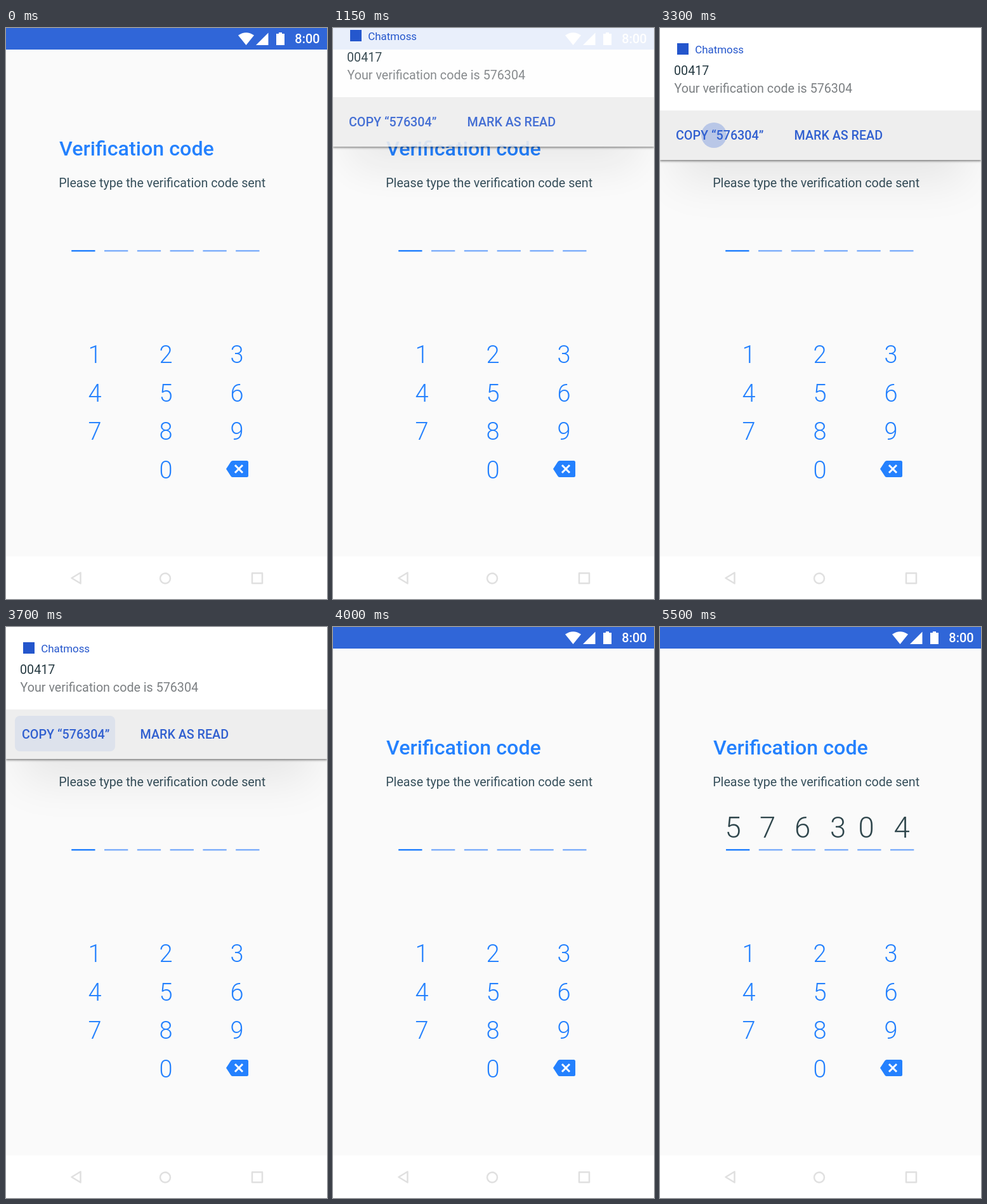
Animation, 506 px wide and 900 px high, one loop 7.5 s. Source, as an HTML page:

```html
<!DOCTYPE html>
<html lang="en">
<head>
<meta charset="utf-8">
<title>Verification code</title>
<style>
  html, body { margin: 0; width: 100%; height: 100%; overflow: hidden; background: #fafafa; }
  #stage { position: relative; width: 506px; height: 900px; overflow: hidden; background: #fafafa; }
  svg { position: absolute; left: 0; top: 0; overflow: visible; }
  text { font-family: Roboto, sans-serif; font-size: 19.7px; }
  .blue { fill: #2481fe; }
  .medium { font-weight: 500; }
  .key { font-size: 38px; font-weight: 300; text-anchor: middle; }
  .digit { font-size: 45.5px; font-weight: 300; text-anchor: middle; fill: #2f464c; }
  .action { font-weight: 500; fill: #3160d0; }
  #card, #popup { position: absolute; opacity: 0; background: #fff; }
  #card {
    left: 0; top: 0; width: 506px; height: 208px;
    box-shadow: 0 2px 3px rgba(0,0,0,.45), 0 60px 70px -25px rgba(0,0,0,.08);
  }
  #popup {
    left: 257px; top: 341px; width: 160px; height: 52px; border-radius: 3px;
    box-shadow: 0 2px 5px rgba(0,0,0,.3);
  }
</style>
</head>
<body>
<div id="stage">
  <svg width="506" height="900" viewBox="0 0 506 900">
    <rect width="506" height="34" fill="#3066d8"/>
    <g fill="#fff">
      <path d="M366 11.5Q378.5 3 391 11.5L378.5 27Z"/>
      <path d="M394 27L413.5 7.5V27Z"/>
      <path d="M426 9H430V7H435V9H439V27H426Z"/>
      <text class="medium" x="455.3" y="24" style="font-size:20px">8:00</text>
    </g>

    <text class="blue medium" x="84" y="201" style="font-size:32.2px">Verification code</text>
    <text x="83.2" y="250.5" fill="#37505c">Please type the verification code sent</text>

    <g id="lines"></g>
    <g id="digits" opacity="0"></g>
    <g id="keys" class="blue"></g>

    <path class="blue" d="M347 695L354.5 683.5Q355.5 682 357.5 682H379.5Q382 682 382 684.5V705.5Q382 708 379.5 708H357.5Q355.5 708 354.5 706.5Z"/>
    <path d="M361 689L373 701M373 689L361 701" stroke="#fff" stroke-width="3"/>

    <rect y="833" width="506" height="67" fill="#fff"/>
    <g fill="none" stroke="#e0e0e0" stroke-width="2.5" stroke-linejoin="round">
      <path d="M103.5 867L117.5 858.5V875.5Z"/>
      <circle cx="251" cy="867.5" r="8"/>
      <rect x="388" y="859.3" width="16" height="16"/>
    </g>
  </svg>

  <div id="popup">
    <svg width="160" height="52">
      <text class="medium" x="80" y="33" text-anchor="middle" fill="#37474f">PASTE</text>
      <circle id="pasteTap" cx="80" cy="26" r="20" fill="#3060d2" opacity="0"/>
    </svg>
  </div>

  <div id="card">
    <svg width="506" height="208">
      <clipPath id="button"><rect x="14" y="140" width="158" height="56" rx="8"/></clipPath>
      <rect x="27" y="24" width="18" height="18" fill="#2456cc"/>
      <text x="55.2" y="40" fill="#2456cc" style="font-size:16.9px">Chatmoss</text>
      <text x="22" y="73.5" fill="#263a42">00417</text>
      <text x="22.6" y="101.5" fill="#7b7f82">Your verification code is 576304</text>
      <rect y="130" width="506" height="78" fill="#eee"/>
      <circle id="ripple" cx="85" cy="169" r="0" fill="#3060d2" opacity=".09" clip-path="url(#button)"/>
      <text class="action" x="25" y="176">COPY “576304”</text>
      <text class="action" x="211.6" y="176">MARK AS READ</text>
      <circle id="copyTap" cx="85" cy="169" r="20" fill="#3060d2" opacity="0"/>
    </svg>
  </div>
</div>

<script>
const LOOP = 7500, STEP = 50;
const $ = id => document.getElementById(id);

function add(parent, tag, attrs, text = '') {
  const el = document.createElementNS('http://www.w3.org/2000/svg', tag);
  for (const name in attrs) el.setAttribute(name, attrs[name]);
  el.textContent = text;
  $(parent).appendChild(el);
}

for (let i = 0; i < 6; i++) {
  add('lines', 'rect', {
    x: 103.2 + i * 51.8, y: 350, width: 37.3, height: 2.5,
    fill: i ? '#80b0fb' : '#2481fe'
  });
}

const slots = [115, 169.5, 224.5, 280.5, 325, 381];
[...'576304'].forEach((d, i) => add('digits', 'text', { class: 'digit', x: slots[i], y: 331.7 }, d));

[...'1234567890'].forEach((d, i) => {
  const col = d === '0' ? 1 : i % 3;
  add('keys', 'text', { class: 'key', x: 140 + col * 112, y: 527.7 + Math.floor(i / 3) * 60.8 }, d);
});

const ramp = (t, from, to) => Math.min(1, Math.max(0, (t - from) / (to - from)));
const set = (id, name, value) => $(id).setAttribute(name, value);
// A tap shows at once, then fades
const tap = (t, from, to) => t < from ? 0 : .28 * (1 - ramp(t, from, to));

function draw(time) {
  const t = Math.floor((time % LOOP) / STEP) * STEP;

  // Notification: decelerates in, accelerates out
  const enter = 1 - Math.pow(1 - ramp(t, 950, 1300), 2.7);
  const leave = ramp(t, 3700, 4000);
  const shown = enter - Math.pow(leave, 1.56);
  $('card').style.transform = `translateY(${Math.round(208 * (shown - 1))}px)`;
  $('card').style.opacity = enter - leave * leave;
  set('copyTap', 'opacity', tap(t, 3300, 3550));
  set('ripple', 'r', t > 3300 ? 20 + 75 * ramp(t, 3300, 3650) : 0);

  // Paste popup and the filled code
  $('popup').style.opacity = ramp(t, 4450, 4650) - ramp(t, 5300, 5500);
  set('pasteTap', 'opacity', tap(t, 5150, 5400));
  set('digits', 'opacity', ramp(t, 5300, 5500));
  set('lines', 'transform', `translate(${0.8 * ramp(t, 5300, 5500)} 0)`);
}

const start = performance.now();
function tick() {
  draw(performance.now() - start);
  requestAnimationFrame(tick);
}
tick();
</script>
</body>
</html>
```
